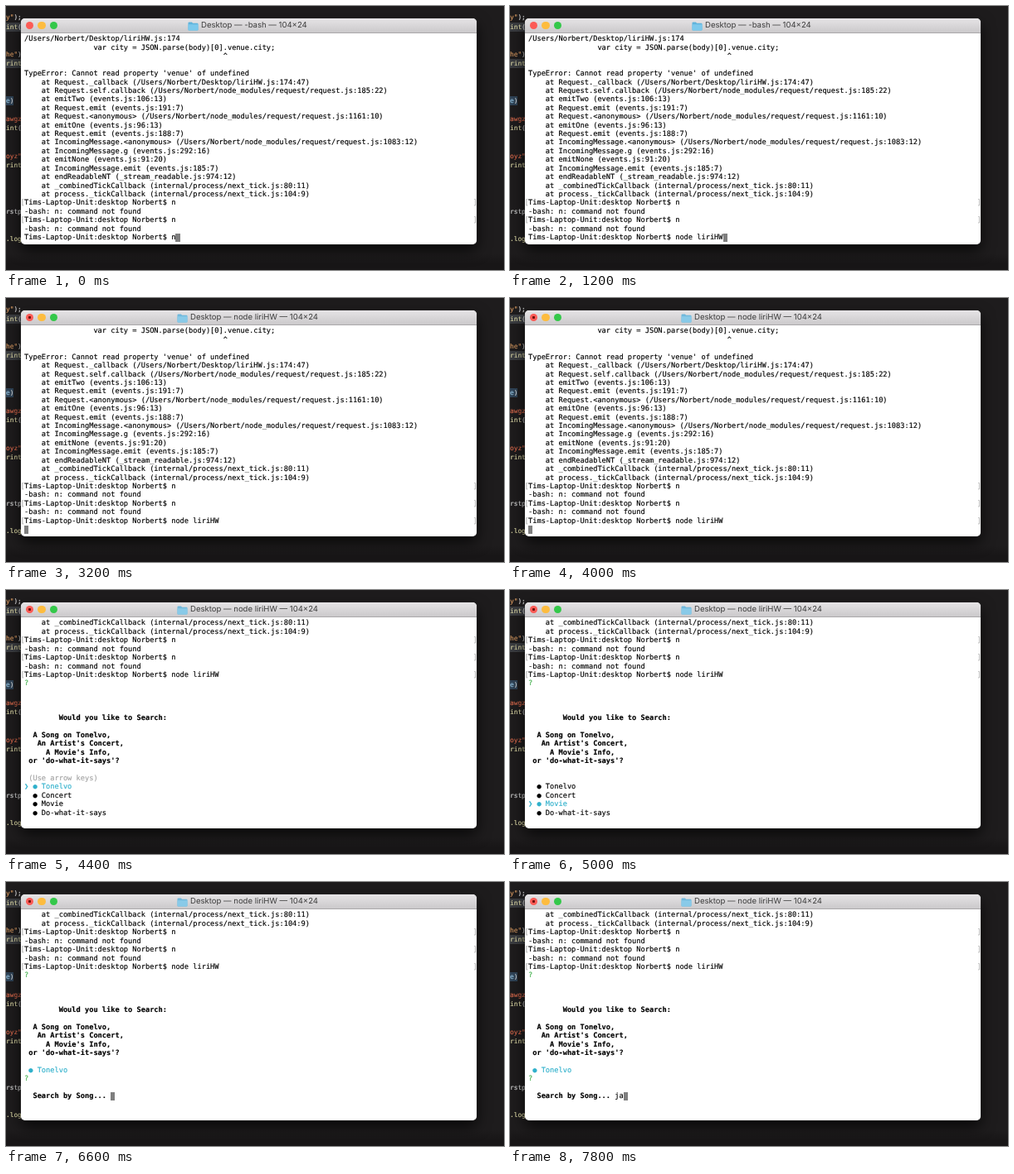
An HTML page for the animation above (8 s loop, 600 by 319 pixels).

```html
<!DOCTYPE html>
<html lang="en">
<head>
<meta charset="utf-8">
<title>Terminal menu</title>
<style>
  html, body { margin: 0; width: 100%; height: 100%; overflow: hidden; background: #1e1c1d; }
  #stage {
    position: relative; width: 600px; height: 319px; overflow: hidden;
    background: linear-gradient(#1e1c1d 0 300px, #181617 312px);
    text-rendering: geometricPrecision;
  }
  #editor span {
    position: absolute; left: 0; white-space: pre;
    font: 7.8px/11.17px "DejaVu Sans Mono", monospace;
    -webkit-text-stroke: .15px;
  }
  #editor .lit { background: #3a3c40; }
  #editor .picked { background: #2f4356; }
  #window {
    position: absolute; left: 18px; top: 15px; width: 549px; height: 273px;
    border-radius: 5px; background: #fff; box-shadow: 0 0 1px #999, 0 7px 17px #000b;
  }
  #bar {
    height: 18px; border-radius: 5px 5px 0 0; border-bottom: 1px solid #aaa8aa;
    box-sizing: border-box; background: linear-gradient(#e6e4e6, #cbc9cb);
  }
  .light { position: absolute; top: 4.2px; width: 9.2px; height: 9.2px; border-radius: 50%; }
  .running #close { background: radial-gradient(circle, #6d100d 1.3px, #fc5b56 2px) !important; }
  #title {
    position: absolute; left: 217px; top: 0; height: 17.6px; white-space: pre; color: #3c3c3c;
    font: 9.55px/17.6px Inter, sans-serif;
  }
  .running #title { left: 204px; }
  #title svg { position: absolute; left: -16px; top: 3.5px; }
  .running svg { opacity: .85; }
  #screen {
    position: absolute; left: 4px; top: 20.4px; margin: 0; color: #000;
    font: 8.66px/10.43px "DejaVu Sans Mono", monospace;
    -webkit-text-stroke: .15px;
  }
  #screen div { position: relative; height: 10.43px; }
  .marked::before, .marked::after { position: absolute; top: 0; color: #aaa; }
  .marked::before { content: "["; left: -4.6px; }
  .marked::after { content: "]"; left: 540.8px; }
  .cell { display: inline-block; width: 1ch; font-style: normal; }
  .cursor {
    display: inline-block; width: 1ch; height: 10.43px; margin-top: -.6px;
    background: #7f7f7f; vertical-align: top;
  }
  .green { color: #3fae49; }
  .cyan { color: #2fb0cb; }
  .gray { color: #a2a2a2; }
</style>
</head>
<body>
<div id="stage">
  <div id="editor"></div>
  <div id="window">
    <div id="bar"></div>
    <i class="light" id="close" style="left:5.6px;background:#fc5b56"></i>
    <i class="light" style="left:20.4px;background:#fdbc3f"></i>
    <i class="light" style="left:35.2px;background:#34c84a"></i>
    <div id="title"><svg width="13" height="11"><path d="M.5 1.5q0-1 1-1h3.5l1 1.2h5.5q1 0 1 1v6.8q0 1-1 1h-10q-1 0-1-1z" fill="#5fb4dc"/><path d="M.5 3.2h12v6.3q0 1-1 1h-10q-1 0-1-1z" fill="#7cc9ec"/></svg><span></span></div>
    <pre id="screen"></pre>
  </div>
</div>
<script>
const LOOP = 8000, ROWS = 24;
const TYPED = 800, RUN = 2800, MENU = 4400, CHOSEN = 6200;
// Menu selection changes: [time, item]
const MOVES = [[4400, 0], [4800, 1], [5000, 2], [5200, 3], [5400, 2], [5600, 1], [5800, 0]];
const ITEMS = ["Tonelvo", "Concert", "Movie", "Do-what-it-says"];

const orange = "#d99a62", red = "#d9694c", yellow = "#e0dca8", blue = "#9ccbe8", plain = "#d8d8d8";
const editorLines = [
  [0, 'y"', orange, ");"], [1, "int", yellow, "(", "lit"],
  [4, 'he"', orange, ")"], [5, "rint", yellow, "", "lit"],
  [9, "e", blue, ")", "picked"], [11, "awgz", red, ""], [12, "int", yellow, "("],
  [15, 'oyz"', red, ""], [16, "rint", yellow, ""],
  [21, "rstp", plain, ""], [24, ".log", yellow, ""]
];
document.getElementById("editor").innerHTML = editorLines.map(([row, text, color, rest, cls = ""]) =>
  `<span class="${cls}" style="top:${8.4 + row * 11.17}px;color:${plain}"><span style="position:static;color:${color}">${text}</span>${rest}</span>`
).join("");

const home = "/Users/Norbert";
const lib = home + "/node_modules/request/request.js";
const prompt = "Tims-Laptop-Unit:desktop Norbert$ ";
const cursor = '<i class="cursor"></i>';
const paint = (cls, text) => `<span class="${cls}">${text}</span>`;
const cell = glyph => `<i class="cell">${glyph}</i>`;
const command = text => ({ marked: true, text: prompt + text });

const trace = [
  "Request._callback (" + home + "/Desktop/liriHW.js:174:47)",
  `Request.self.callback (${lib}:185:22)`,
  "emitTwo (events.js:106:13)",
  "Request.emit (events.js:191:7)",
  `Request.&lt;anonymous&gt; (${lib}:1161:10)`,
  "emitOne (events.js:96:13)",
  "Request.emit (events.js:188:7)",
  `IncomingMessage.&lt;anonymous&gt; (${lib}:1083:12)`,
  "IncomingMessage.g (events.js:292:16)",
  "emitNone (events.js:91:20)",
  "IncomingMessage.emit (events.js:185:7)",
  "endReadableNT (_stream_readable.js:974:12)",
  "_combinedTickCallback (internal/process/next_tick.js:80:11)",
  "process._tickCallback (internal/process/next_tick.js:104:9)"
].map(call => "    at " + call);

const notFound = "-bash: n: command not found";
const history = [
  home + "/Desktop/liriHW.js:174",
  " ".repeat(16) + "var city = JSON.parse(body)[0].venue.city;",
  " ".repeat(46) + "^", "",
  "TypeError: Cannot read property 'venue' of undefined",
  ...trace, command("n"), notFound, command("n"), notFound
];
const question = [
  paint("green", "?"), "", "", "",
  "<b>        Would you like to Search:</b>", "",
  `<b>  A Song on ${ITEMS[0]},</b>`,
  "<b>   An Artist's Concert,</b>",
  "<b>     A Movie's Info,</b>",
  "<b> or 'do-what-it-says'?</b>", ""
];

function menu(t) {
  const selected = MOVES.filter(([start]) => t >= start).pop()[1];
  const hint = t < MOVES[1][0] ? paint("gray", " (Use arrow keys)") : "";
  const rows = ITEMS.map((name, i) => i === selected
    ? paint("cyan", `${cell("❯")} ${cell("●")} ${name}`)
    : `  ${cell("●")} ${name}`);
  return [hint, ...rows, ""];
}

function search(t) {
  const typed = t >= 7800 ? "ja" : t >= 7600 ? "j" : "";
  return [
    " " + paint("cyan", `${cell("●")} ${ITEMS[0]}`), paint("green", "?"), "",
    `<b>  Search by Song...</b> ${typed}${cursor}`, "", ""
  ];
}

function linesAt(t) {
  if (t < RUN) return [...history, prompt + (t < TYPED ? "n" : "node liriHW") + cursor];
  const started = [...history, command("node liriHW")];
  if (t < MENU) return [...started, cursor];
  return [...started, ...question, ...(t < CHOSEN ? menu(t) : search(t))];
}

const terminal = document.getElementById("window");
const output = document.getElementById("screen");
const label = document.querySelector("#title span");
let shown = "";

function draw(now) {
  const t = now % LOOP, running = t >= RUN;
  const html = linesAt(t).slice(-ROWS).map(line =>
    line.marked ? `<div class="marked">${line.text}</div>` : `<div>${line}</div>`).join("");
  if (html !== shown) {
    output.innerHTML = shown = html;
    label.textContent = `Desktop — ${running ? "node liriHW" : "-bash"} — 104×24`;
    terminal.classList.toggle("running", running);
  }
  requestAnimationFrame(draw);
}
draw(performance.now());
</script>
</body>
</html>
```
